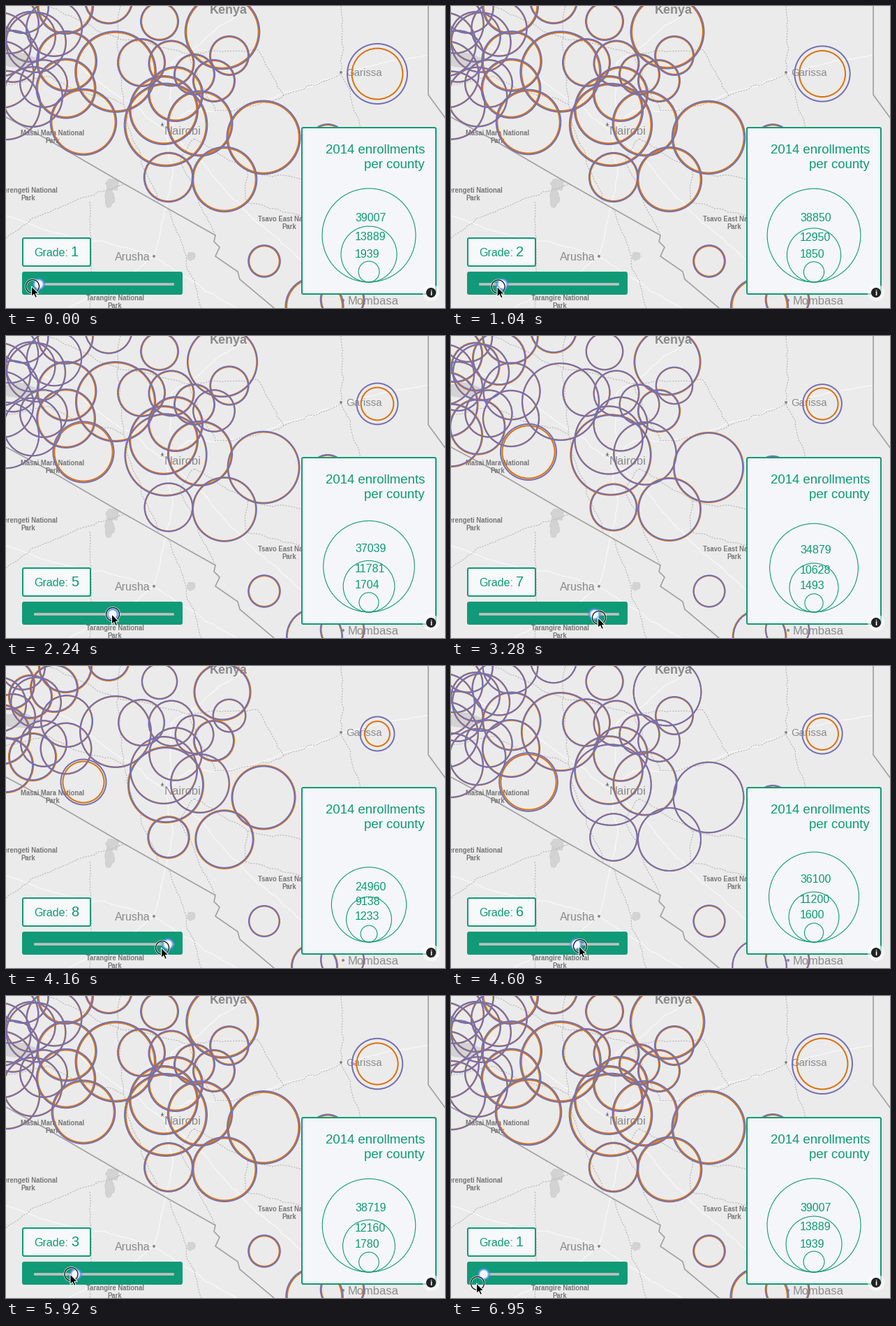
These frames come from a looping animation (629x432 px, 8290 ms). A matplotlib script:

```python
import numpy as np
import matplotlib.pyplot as plt
from matplotlib.animation import FuncAnimation
from matplotlib.patches import Circle, FancyBboxPatch, Polygon

W, H, DPI = 629, 432, 64
PT = 72 / DPI
LOOP_MS, FRAMES = 8290, 56
TEAL, PURPLE, ORANGE = "#109a77", "#7470b3", "#d9730d"
LAND, GREY, DARK_GREY = "#ebebeb", "#8b8b8b", "#777777"

plt.rcParams["font.family"] = "Liberation Sans"
rng = np.random.default_rng(4)
fig = plt.figure(figsize=(W / DPI, H / DPI), dpi=DPI, facecolor=LAND)
ax = fig.add_axes([0, 0, 1, 1])
ax.set(xlim=(0, W), ylim=(H, 0))
ax.axis("off")


def label(x, y, text, size, color=GREY, ha="left", z=3, weight="normal"):
    """Text whose capitals are centred on y; size in pixels."""
    return ax.text(x, y + 0.36 * size, text, fontsize=size * PT, color=color,
                   ha=ha, va="baseline", zorder=z, weight=weight)


def path(points, color, width, wander=0.0, style="-", z=1):
    """Polyline in pixels; wander adds a random walk pinned at each point."""
    points = np.array(points, float)
    if wander:
        pieces = []
        for a, b in zip(points, points[1:]):
            n = max(4, int(np.hypot(*(b - a)) / 6))
            t = np.linspace(0, 1, n)[:, None]
            walk = np.cumsum(rng.normal(0, wander, (n, 2)), axis=0)
            pieces.append(a + (b - a) * t + walk - walk[0] - (walk[-1] - walk[0]) * t)
        points = np.vstack(pieces)
    ax.plot(*points.T, color=color, lw=width * PT, ls=style, zorder=z)


def box(x0, y0, x1, y1, fill, z):
    ax.add_patch(FancyBboxPatch((x0 + 1, y0 + 1), x1 - x0 - 2, y1 - y0 - 2,
                                boxstyle="round,pad=0,rounding_size=2",
                                fc=fill, ec=TEAL, lw=2 * PT, zorder=z))


def disc(x, y, r, z, fill="none", edge="none", width=0.0, alpha=None):
    return ax.add_patch(Circle((x, y), r, fc=fill, ec=edge, lw=width * PT,
                               zorder=z, alpha=alpha))


def lake(x, y, rx, ry):
    angle = np.linspace(0, 2 * np.pi, 16)
    rough = rng.uniform(0.75, 1.15, 16)
    outline = np.column_stack([x + rx * rough * np.cos(angle), y + ry * rough * np.sin(angle)])
    ax.add_patch(Polygon(outline, fc="#d3d3d3", ec="#c9c9c9", lw=0.6, zorder=0.5))


def draw_map():
    lake(152, 256, 9, 9)
    lake(148, 274, 7, 14)
    lake(18, 77, 27, 11)
    lake(265, 358, 6, 6)

    nairobi, garissa, arusha = (228, 178), (480, 97), (212, 358)
    roads = [
        [nairobi, (262, 150), (330, 148), garissa, (605, 70)],
        [nairobi, (100, 80), (0, 30)],
        [nairobi, (238, 245), arusha, (90, 432)],
        [nairobi, (340, 290), (483, 421)],
        [(0, 300), arusha, (330, 432)],
        [nairobi, (237, 82), (350, 0)],
    ]
    for road in roads:
        path(road, "#f8f8f8", 1.4, 0.9)

    west, centre, east = (168, 140), (262, 68), (398, 128)
    borders = [
        [(164, 0), (160, 60), west, (218, 280)],
        [(0, 114), (60, 100), west],
        [(60, 0), (165, 48), centre, (360, 62), east],
        [centre, (300, 150), east, garissa, (508, 174)],
        [(270, 190), (346, 236), (424, 248)],
        [(270, 190), (250, 220), (300, 328)],
        [(346, 236), (344, 280), (424, 300)],
        [(480, 0), garissa],
        [(0, 332), (36, 304), (170, 255)],
        [(120, 280), (120, 432)],
        [(232, 290), (280, 432)],
    ]
    for border in borders:
        path(border, "#b7b7b7", 1.1, 1.2, (0, (2, 1.6)))

    nation = [(0, 159), (58, 190), (165, 252), (300, 328), (298, 337), (306, 345),
              (300, 358), (332, 380), (335, 391), (384, 432)]
    path(nation, "#a2a2a2", 1.7)
    path([(605, 0), (605, 127), (630, 161)], "#a2a2a2", 1.7)

    label(319, 5, "Kenya", 18, ha="center", weight="bold")
    label(487, 95, "Garissa", 15)
    label(227, 178, "Nairobi", 16.5)
    label(156, 358, "Arusha", 16)
    label(490, 421, "Mombasa", 16.5)
    for x, y in [(480, 95), arusha, (483, 421)]:
        disc(x, y, 2, 3, GREY)
    ax.plot(224, 170, "*", color=DARK_GREY, ms=8, mew=0, zorder=3)
    parks = [(67, 182, "Masai Mara National"), (32, 264, "Serengeti National"),
             (406, 305, "Tsavo East National"), (156, 418, "Tarangire National")]
    for x, y, name in parks:
        label(x, y, name, 9.5, DARK_GREY, "center", weight="bold")
        label(x, y + 11, "Park", 9.5, DARK_GREY, "center", weight="bold")


# x, y, radius in grade 1, radius in grade 8; grouped by the larger ring in grade 8
ORANGE_LEADS = [
    (369, 188, 52.5, 44.5), (313, 248, 46.3, 40.7), (229, 170, 59.3, 53),
    (233, 245, 35.3, 28.7), (298, 107, 30, 28), (310, 37, 53.3, 39.5),
    (442, 430, 41.5, 32), (147, -9, 34.3, 29), (38, 130, 43, 33),
    (0, 142, 49.3, 38), (-8, 98, 48, 42), (35, 44, 36, 30),
    (69, 32, 40, 33), (85, 0, 40, 37), (5, 26, 42, 35),
]
PURPLE_LEADS = [
    (278, 168, 46.5, 42), (226, 149, 49, 48), (157, 94, 57.8, 51),
    (194, 81, 34, 33), (237, 82, 32.5, 32.5), (243, 126, 39, 37.8),
    (270, 98, 29, 27.5), (320, 71, 28, 23.5), (220, 22, 27, 25.3),
    (370, 365, 22.8, 22), (461, 196, 27, 20), (482, 420, 31.3, 31),
    (87, 79, 43, 37), (86, 118, 42.5, 36.5), (54, 111, 34, 33),
    (43, 52, 43, 36), (10, 72, 37, 32), (24, 2, 37, 32), (-10, 55, 46, 39),
]


def county(x, y, r1, r8, gap8, gap1=None, r5=None):
    """Build both rings and their radii as functions of the grade."""
    drop = r1 - r8
    r5 = r5 or r1 - 0.017 * drop ** 2
    r7 = r5 + 0.32 * (r8 - r5)
    if gap1 is None:
        gap1 = -0.5 if x < 80 else -1.1 if r1 < 36 else -1.6

    def radii(grade):
        outer = np.interp(grade, [1, 5, 7, 8], [r1, r5, r7, r8])
        gap = np.interp(grade, [1, 4, 7, 8], [gap1, gap1, 0.8 * gap8, gap8])
        return outer, outer + gap

    orange = disc(x, y, r1, 4, edge=ORANGE, width=2)
    purple = disc(x, y, r1, 5, edge=PURPLE, width=2)
    return radii, purple, orange


draw_map()
rings = [county(*row, gap8=1.1) for row in ORANGE_LEADS]
rings += [county(*row, gap8=-0.5) for row in PURPLE_LEADS]
rings.append(county(532, 97, 43, 24.5, gap8=-6.6, gap1=-6.6, r5=29.5))
rings.append(county(111, 166, 47.2, 32.5, gap8=-3))

LEGEND = [(39007, 13889, 1939), (38850, 12950, 1850), (38719, 12160, 1780),
          (38537, 12406, 1762), (37039, 11781, 1704), (36100, 11200, 1600),
          (34879, 10628, 1493), (24960, 9138, 1233)]

# Legend panel
box(423, 173, 617, 413, "#f5f6f9", 6)
label(600, 204, "2014 enrollments", 18.6, TEAL, "right", 7)
label(600, 225, "per county", 18.6, TEAL, "right", 7)
legend = [(disc(520, 395, 1, 7, edge=TEAL, width=1.1), label(500, 0, "", 16, TEAL, z=8))
          for _ in range(3)]
disc(609, 410, 12, 8, "white", alpha=0.6)
disc(609, 410, 7, 9, "#222222")
label(609, 410, "i", 11, "white", "center", 10, "bold")

# Grade box and slider
box(23, 331, 122, 373, "#f7f8f9", 6)
label(40, 352, "Grade:", 16, TEAL, z=7)
grade_text = label(93, 351, "1", 20, TEAL, z=7)
box(23, 380, 253, 413, TEAL, 6)
path([(41.5, 398), (238.5, 398)], "#bfc1c0", 3.6, z=7)
thumb = [disc(47, 398, r, 8, c, alpha=a)
         for r, c, a in [(9.5, "#4c8df0", .35), (8.3, "#4c8df0", .55),
                         (7.2, "#8ab6f7", 1), (5.6, "#f6f8fc", 1)]]

ARROW = np.array([(0, 0), (0, 14.5), (3.3, 11.4), (5.6, 16.4),
                  (8, 15.3), (5.8, 10.5), (10.2, 10.2)])
halo = disc(0, 0, 9.5, 9, edge="white", width=3, alpha=0.75)
ring = disc(0, 0, 9.5, 10, edge="#111111", width=1.3)
arrow = ax.add_patch(Polygon(ARROW, fc="black", ec="white", lw=PT, zorder=11))

# Cursor route: step, x, y
ROUTE = np.array([(0, 38, 401), (3, 45, 403), (5, 45, 403), (11, 113, 398.5),
                  (15, 153, 398), (22, 212, 403), (25, 233, 403), (27, 233, 403),
                  (28, 224, 403), (35, 133, 398), (43, 54, 398), (44, 54, 398),
                  (46, 38, 411)])
THUMB_MIN, THUMB_STEP = 47, 26.43


def update(i):
    step, route_x, route_y = ROUTE.T
    x, y = np.interp(i, step, route_x), np.interp(i, step, route_y)
    grade = int(np.clip(np.floor((x - THUMB_MIN) / THUMB_STEP + 0.499), 0, 7)) + 1

    for radii, purple, orange in rings:
        outer, inner = radii(grade)
        purple.set_radius(outer)
        orange.set_radius(inner)

    for value, (circle, text) in zip(LEGEND[grade - 1], legend):
        r = 67 * np.sqrt(value / LEGEND[0][0])
        circle.set_center((520, 395 - r))
        circle.set_radius(r)
        text.set_text(str(value))
        text.set_y(395 - r - 26 + 0.36 * 16)

    grade_text.set_text(str(grade))
    for part in thumb:
        part.set_center((THUMB_MIN + (grade - 1) * THUMB_STEP, 398))
    for part in (halo, ring, arrow):
        part.set_visible(i <= step[-1])
    halo.set_center((x, y))
    ring.set_center((x, y))
    arrow.set_xy(ARROW + (x - 1.5, y))


anim = FuncAnimation(fig, update, frames=FRAMES, interval=LOOP_MS / FRAMES,
                     repeat=True, repeat_delay=0, blit=False)
plt.show()
```
